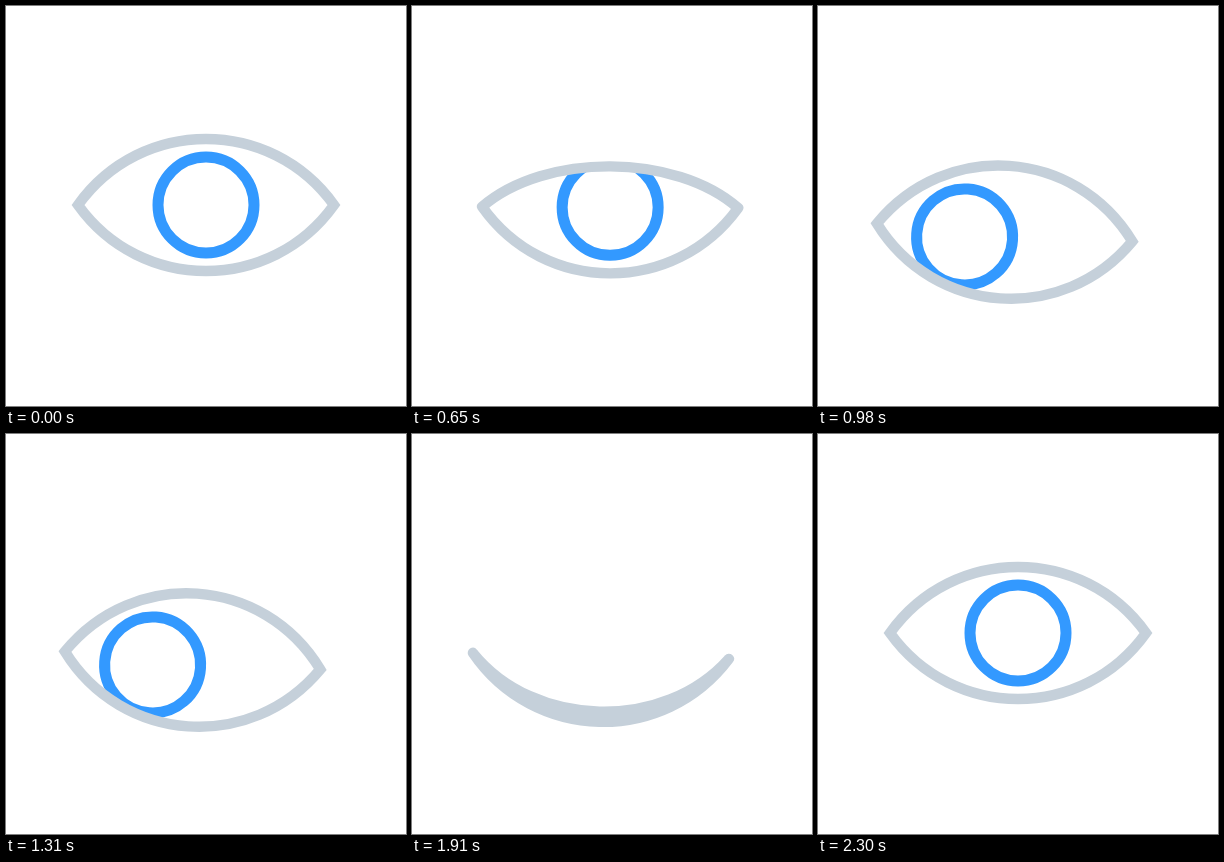
These frames come from a looping animation (400x400 px, 2.39 s). An HTML page with a canvas:

```html
<!DOCTYPE html>
<html lang="en">
<head>
<meta charset="utf-8">
<title>Blinking eye</title>
<style>
html, body { margin: 0; height: 100%; overflow: hidden; background: #fff; }
canvas { display: block; width: 100vw; height: 100vh; }
</style>
</head>
<body>
<canvas id="stage" width="400" height="400"></canvas>
<script>
const ctx = document.getElementById('stage').getContext('2d');
const LOOP = 2390, START = 530, STEP = 30;
const HALF = 128, SAG = 66;

// Smooth step from 0 to 1 between two times
function ramp(t, from, to) {
  const p = Math.min(1, Math.max(0, (t - from) / (to - from)));
  return (1 - Math.cos(Math.PI * p)) / 2;
}

const pulse = (t, from, peak, to) => ramp(t, from, peak) - ramp(t, peak, to);

// The eye blinks while it glances aside, and blinks again on the way back
function poseAt(t) {
  const drop = ramp(t, 575, 815) - ramp(t, 1925, 2115);
  const turn = ramp(t, 815, 985) - ramp(t, 1685, 1925);
  const glance = ramp(t, 735, 975) - ramp(t, 1885, 2115);
  const shut = pulse(t, 575, 815, 985) + pulse(t, 1685, 1925, 2115);
  const lift = pulse(t, 500, 575, 815) + pulse(t, 2000, 2115, 2300);
  const shift = 0.83 * drop + 0.17 * turn;
  return {
    x: 200 - 13.4 * shift + 0.8 * lift,
    y: 199 + 27.5 * shift - 3.5 * lift,
    tilt: 1.3 * drop + 2.7 * turn,
    lid: -SAG - turn - 3 * lift + 123 * shut,
    irisX: -39.6 * glance,
    irisY: 7.2 * glance,
    blinking: shut + lift > 0.02
  };
}

function eyePath(lid) {
  const path = new Path2D();
  path.moveTo(-HALF, 0);
  path.bezierCurveTo(-65, lid * 4 / 3, 65, lid * 4 / 3, HALF, 0);
  path.bezierCurveTo(65, SAG * 4 / 3, -65, SAG * 4 / 3, -HALF, 0);
  path.closePath();
  return path;
}

function draw(t) {
  const pose = poseAt(t);
  const eye = eyePath(pose.lid);

  ctx.fillStyle = '#fff';
  ctx.fillRect(0, 0, 400, 400);
  ctx.save();
  ctx.translate(pose.x, pose.y);
  ctx.rotate(pose.tilt * Math.PI / 180);

  ctx.save();
  ctx.clip(eye);
  ctx.strokeStyle = '#3399ff';
  ctx.lineWidth = 11;
  ctx.beginPath();
  ctx.arc(pose.irisX, pose.irisY, 48, 0, 2 * Math.PI);
  ctx.stroke();
  ctx.restore();

  ctx.strokeStyle = '#c5d0da';
  ctx.lineWidth = 10.4;
  ctx.lineJoin = pose.blinking ? 'round' : 'miter';
  ctx.stroke(eye);
  ctx.restore();
}

function tick() {
  const t = performance.now() % LOOP;
  draw(t < START ? 0 : START + Math.floor((t - START) / STEP) * STEP);
  requestAnimationFrame(tick);
}
tick();
</script>
</body>
</html>
```
